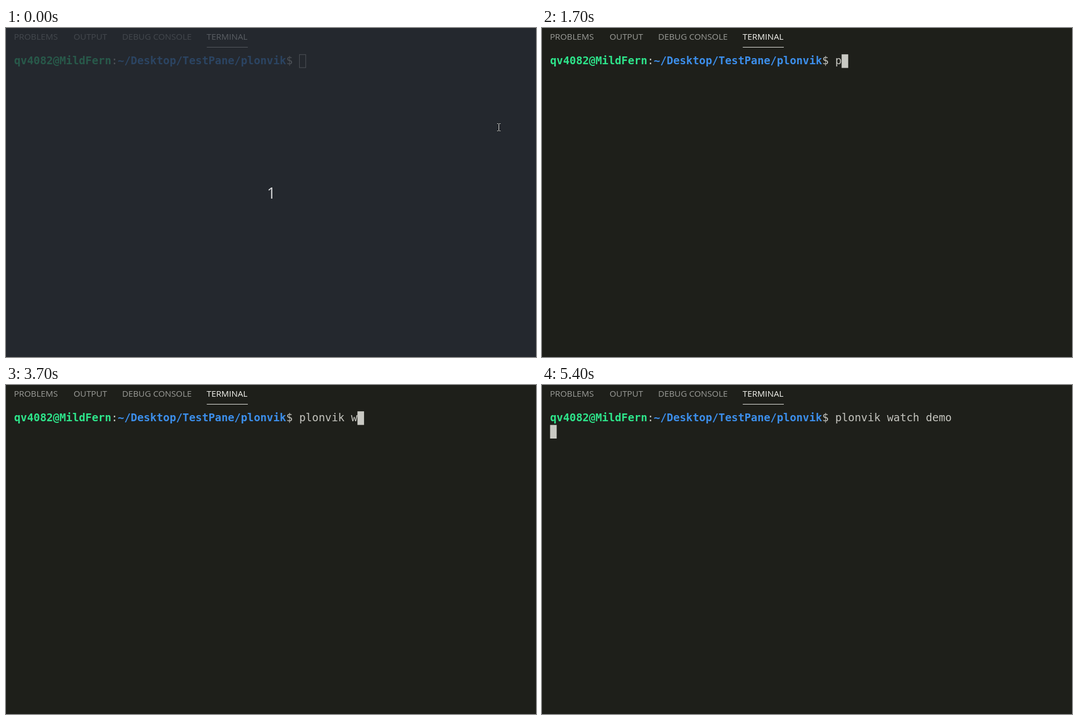
An HTML page that plays this animation: 949 px wide and 590 px high, repeating every 8000 ms.

```html
<!DOCTYPE html>
<html lang="en">
<head>
<meta charset="utf-8">
<title>Terminal</title>
<style>
  html, body { margin: 0; width: 100%; height: 100%; overflow: hidden; background: #1e1f1a; }
  svg { display: block; width: 949px; height: 590px; }
  text { white-space: pre; }
  .tab { font: 15.2px "Open Sans", sans-serif; fill: #9b9c98; }
  .active { fill: #f4f4ef; }
  .mono { font: 19.27px "DejaVu Sans Mono", monospace; fill: #c4c4be; }
  .bold { font-weight: bold; }
  .count { font: 500 27.5px "Open Sans", sans-serif; fill: #d9dadb; text-anchor: middle; }
</style>
</head>
<body>
<svg viewBox="0 0 949 590">
  <rect width="949" height="590" fill="#1e1f1a"/>
  <g id="tabs"></g>
  <rect x="359.5" y="34" width="73.5" height="1" fill="#e4e4df"/>
  <g id="prompt"></g>
  <text id="typed" class="mono" y="65"></text>
  <rect id="caret" stroke="#c9c9c3"/>
  <g id="count">
    <rect width="949" height="590" fill="#262b35" opacity=".75"/>
    <text class="count" x="475" y="305.5">1</text>
  </g>
  <g id="mouse" fill="none">
    <path d="M-3.5-6.5H-1L0-5.5L1-6.5H3.5M-3.5 6.5H-1L0 5.5L1 6.5H3.5M0-5.5V5.5" stroke="#111" stroke-width="2.4" opacity=".5"/>
    <path d="M-3-6.5H-1L0-5.5L1-6.5H3M-3 6.5H-1L0 5.5L1 6.5H3M0-5.5V5.5" stroke="#e4e6e4"/>
  </g>
</svg>
<script>
const LOOP = 8000, LEFT = 14.5, CELL = 11.6, TOP = 47.2, LINE = 24.4;
const COMMAND = "plonvik watch demo";
const KEYS = [1700, 1800, 2000, 2200, 3000, 3100, 3300, 3600, 3700, 3800, 3900,
  4100, 4300, 4500, 4700, 4800, 4900, 5100];
const FOCUS = 1100, ENTER = 5300, NEW_LINE = 5400, HIDE_MOUSE = 1400;
const MOUSE = [[0, 882.5, 178], [200, 770.5, 152], [800, 752.5, 147], [900, 735.5, 144],
  [1100, 728.5, 143], [1200, 776.5, 194], [1300, 831.5, 253]];

const $ = id => document.getElementById(id);
const set = (el, attrs) => {
  for (const key in attrs) el.setAttribute(key, attrs[key]);
};
const show = (el, on) => set(el, { visibility: on ? "visible" : "hidden" });
const colX = n => LEFT + n * CELL;

function addText(parent, str, attrs) {
  const el = document.createElementNS("http://www.w3.org/2000/svg", "text");
  el.textContent = str;
  set(el, attrs);
  parent.append(el);
}

for (const [x, name] of [[14.2, "PROBLEMS"], [121, "OUTPUT"], [208, "DEBUG CONSOLE"], [359.3, "TERMINAL"]])
  addText($("tabs"), name, { x, y: 21, class: name === "TERMINAL" ? "tab active" : "tab" });

let col = 0;
for (const [str, color] of [["qv4082@MildFern", "#2ee58b"], [":", ""], ["~/Desktop/TestPane/plonvik", "#3c8eea"], ["$ ", ""]]) {
  addText($("prompt"), str, {
    x: colX(col), y: 65, class: color ? "mono bold" : "mono", style: color && "fill:" + color
  });
  col += str.length;
}
set($("typed"), { x: colX(col) });

function drawCaret(t, count) {
  const focused = t >= FOCUS, below = t >= NEW_LINE;
  const x = colX(below ? 0 : col + count), y = TOP + (below ? LINE : 0);
  const inset = focused ? 0 : 0.5;
  set($("caret"), {
    x: x + inset, y: y + inset,
    width: CELL + 0.2 - inset, height: LINE - inset * 2,
    fill: focused ? "#c9c9c3" : "none", "stroke-width": focused ? 0 : 1
  });
  show($("caret"), t < ENTER || below);
}

function draw(t) {
  const count = KEYS.filter(k => k <= t).length;
  $("typed").textContent = COMMAND.slice(0, count);
  drawCaret(t, count);
  show($("count"), t < 100);
  const [, x, y] = MOUSE.filter(m => m[0] <= t).pop();
  set($("mouse"), { transform: `translate(${x} ${y})` });
  show($("mouse"), t < HIDE_MOUSE);
}

let start;
function tick(now) {
  start ??= now;
  draw(Math.max(0, now - start) % LOOP);
  requestAnimationFrame(tick);
}
draw(0);
requestAnimationFrame(tick);
</script>
</body>
</html>
```
